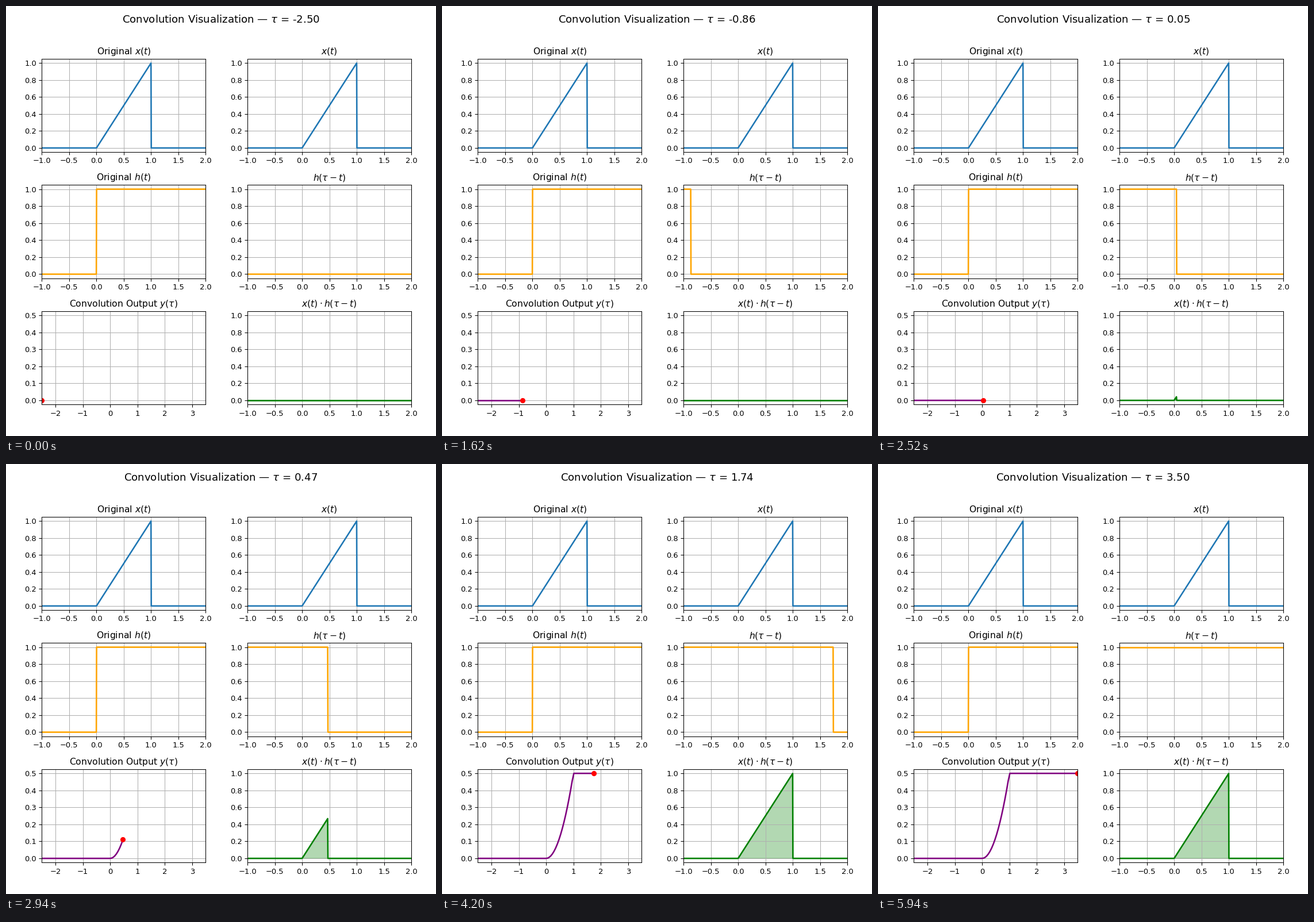
A matplotlib script for the animation above (6 s loop, 748x748 px).

```python
import numpy as np
import matplotlib.pyplot as plt
from matplotlib.animation import FuncAnimation

SIZE, INCHES = 748, 8
FRAMES, INTERVAL = 100, 60

t = np.linspace(-5, 5, 2000)
taus = np.linspace(-2.5, 3.5, FRAMES)
output = np.clip(taus, 0, 1) ** 2 / 2


def ramp(s):
    return np.where((s >= 0) & (s <= 1), s, 0.0)


def step(s):
    return np.where(s >= 0, 1.0, 0.0)


fig, axes = plt.subplots(3, 2, figsize=(INCHES, INCHES), dpi=SIZE / INCHES)


def panel(row, col, title, xlim=(-1, 2), top=1.0):
    ax = axes[row, col]
    ax.set_title(title)
    ax.set_xlim(*xlim)
    ax.set_ylim(-0.05 * top, 1.05 * top)
    ax.grid(True)
    return ax


x = ramp(t)
panel(0, 0, r"Original $x(t)$").plot(t, x, lw=2)
panel(0, 1, r"$x(t)$").plot(t, x, lw=2)
panel(1, 0, r"Original $h(t)$").plot(t, step(t), color="orange", lw=2)

ax_h = panel(1, 1, r"$h(\tau - t)$")
h_line, = ax_h.plot(t, 0 * t, color="orange", lw=2)

ax_y = panel(2, 0, r"Convolution Output $y(\tau)$", (-2.5, 3.5), 0.5)
y_line, = ax_y.plot([], [], color="purple", lw=2)
dot, = ax_y.plot([], [], "ro")

ax_p = panel(2, 1, r"$x(t) \cdot h(\tau - t)$")
p_line, = ax_p.plot(t, 0 * t, color="green", lw=2)
area = ax_p.fill_between(t, 0 * t, color="green", alpha=0.3)

# Lay out the panels before the heading exists so it claims no extra margin
fig.tight_layout(pad=2.5, h_pad=1.0, rect=[0, 0, 1, 0.95])
heading = fig.suptitle("", fontsize=14)


def update(i):
    tau = taus[i]
    h = step(tau - t)
    product = x * h
    h_line.set_ydata(h)
    p_line.set_ydata(product)
    area.set_verts([np.column_stack([t, product])])
    y_line.set_data(taus[:i + 1], output[:i + 1])
    dot.set_data([tau], [output[i]])
    heading.set_text(rf"Convolution Visualization — $\tau$ = {tau:.2f}")
    return h_line, p_line, area, y_line, dot, heading


anim = FuncAnimation(fig, update, frames=FRAMES, interval=INTERVAL,
                     repeat=True, repeat_delay=0)
plt.show()
```
